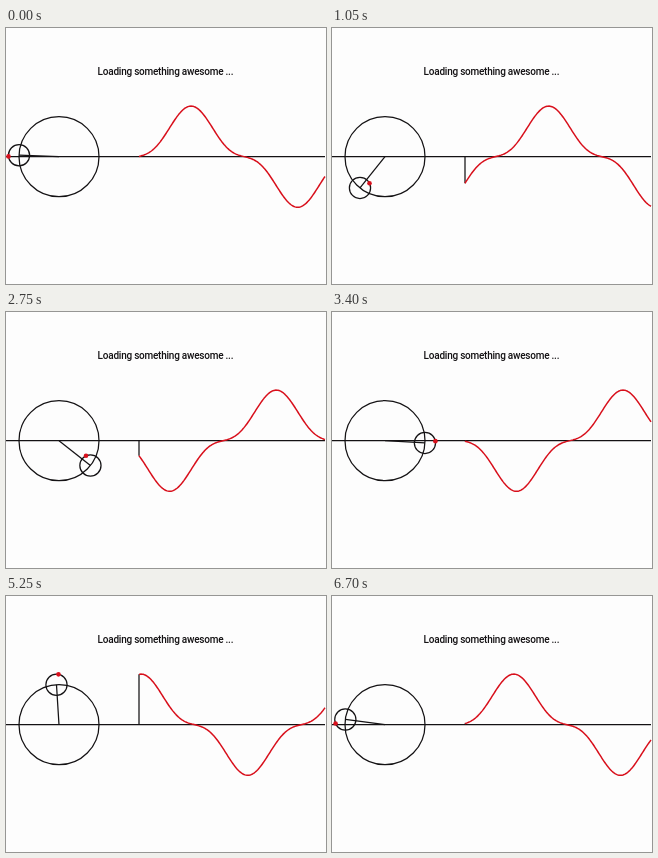
Animation, 320 px wide and 256 px high, one loop 6750 ms. Source, as an HTML page:

```html
<!DOCTYPE html>
<html lang="en">
<head>
<meta charset="utf-8">
<title>Loading</title>
<style>
  html, body { margin: 0; width: 100%; height: 100%; overflow: hidden; background: #fdfdfd; }
  svg { display: block; width: 100%; height: 100%; }
  .ink { fill: none; stroke: #141214; stroke-width: 1.25; }
  #wave { fill: none; stroke: #d8101c; stroke-width: 1.5; stroke-linejoin: round; }
  #dot { fill: #d8101c; }
  text { font: 500 10px Roboto, Inter, sans-serif; letter-spacing: -.24px; fill: #141214; }
</style>
</head>
<body>
<svg viewBox="0 0 320 256">
  <text x="159.4" y="46.5" text-anchor="middle">Loading something awesome ...</text>
  <path class="ink" d="M0 128.7H319"/>
  <circle class="ink" cx="53" cy="128.7" r="40"/>
  <path class="ink" id="arm"/>
  <circle class="ink" id="small" r="10.6"/>
  <path class="ink" id="stem"/>
  <path id="wave"/>
  <circle id="dot" r="2.3"/>
</svg>
<script>
  const LOOP = 6750, STEP = 50;
  const CX = 53, CY = 128.7, R = 40, r = 10.6;
  const LEFT = 133, RIGHT = 319, PX_PER_TURN = 213.2;

  // [ms, degrees past the leftmost point]; includes one short stall
  const keys = [
    [0, -2.1], [1050, 51.3], [1400, 70], [1550, 70], [1600, 80], [2100, 106.8],
    [3400, 176.8], [4400, 230.5], [5250, 273.6], [6700, 352.5]
  ];

  const el = id => document.getElementById(id);
  const arm = el('arm'), small = el('small'), stem = el('stem'), wave = el('wave'), dot = el('dot');

  function angleAt(ms) {
    const i = Math.max(1, keys.findIndex(k => k[0] >= ms));
    const [t0, a0] = keys[i - 1], [t1, a1] = keys[i];
    const deg = a0 + (a1 - a0) * (ms - t0) / (t1 - t0);
    return (180 + deg) * Math.PI / 180;
  }

  const height = a => CY - R * Math.sin(a) + r * Math.sin(3 * a);

  function place(circle, x, y) {
    circle.setAttribute('cx', x.toFixed(2));
    circle.setAttribute('cy', y.toFixed(2));
  }

  function draw(now) {
    const a = angleAt(Math.floor(now % LOOP / STEP) * STEP);
    const x = CX + R * Math.cos(a), y = CY - R * Math.sin(a);
    const tip = height(a);

    arm.setAttribute('d', `M${CX} ${CY}L${x} ${y}`);
    place(small, x, y);
    place(dot, x + r * Math.cos(3 * a), tip);
    stem.setAttribute('d', `M${LEFT} ${CY}V${tip}`);

    const points = [];
    for (let px = LEFT; px <= RIGHT; px++) {
      points.push(px + ' ' + height(a - (px - LEFT) / PX_PER_TURN * 2 * Math.PI).toFixed(2));
    }
    wave.setAttribute('d', 'M' + points.join('L'));
  }

  function tick() {
    draw(performance.now());
    requestAnimationFrame(tick);
  }
  tick();
</script>
</body>
</html>
```
